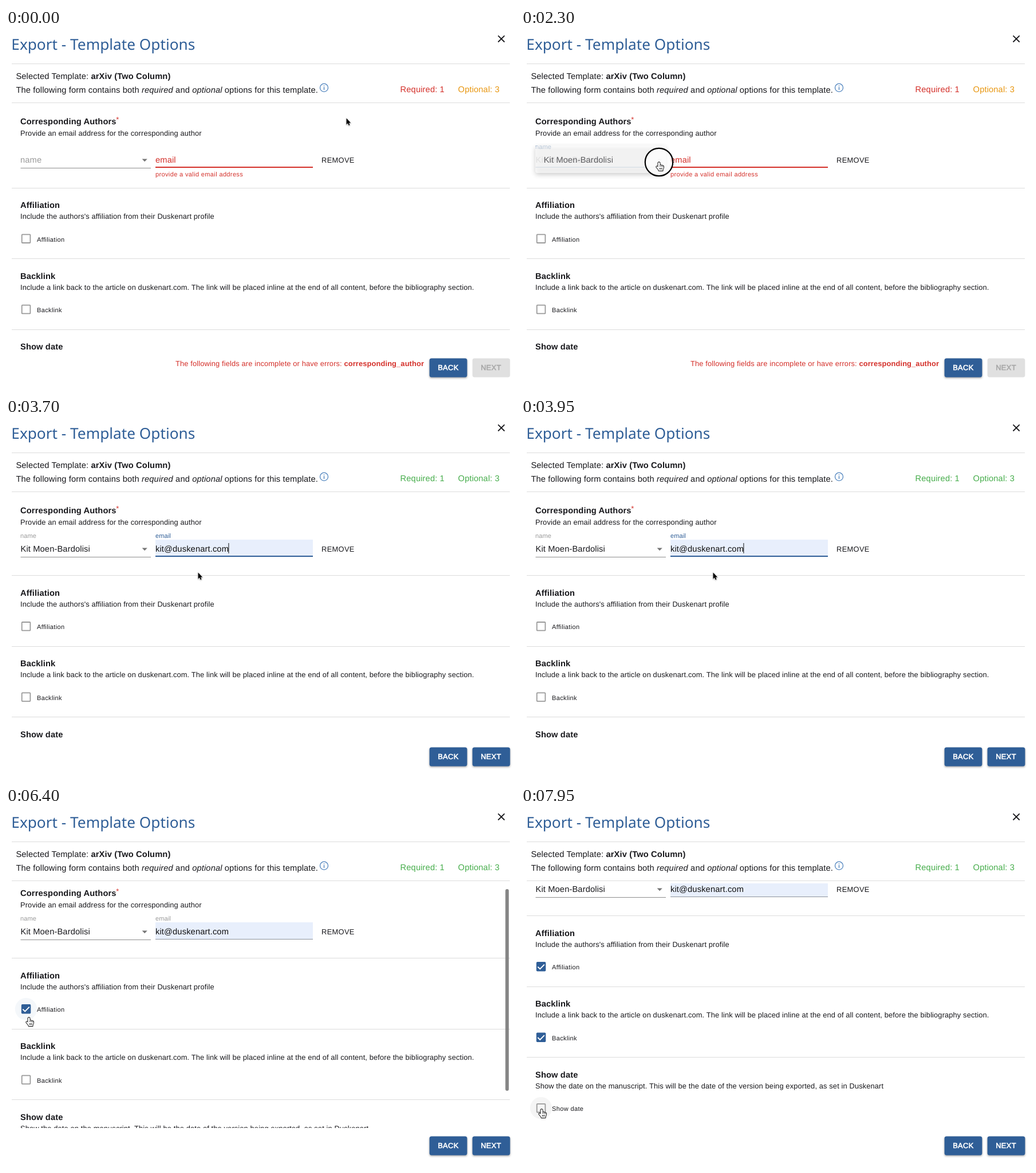
An HTML page with a canvas that plays this animation: 889x630 px, repeating every 8000 ms.

```html
<!DOCTYPE html>
<html lang="en">
<head>
<meta charset="utf-8">
<title>Export - Template Options</title>
<style>
html, body { margin: 0; width: 100%; height: 100%; overflow: hidden; background: #fff; }
canvas { display: block; width: 889px; height: 630px; }
</style>
</head>
<body>
<canvas id="stage"></canvas>
<script>
const W = 889, H = 630, LOOP = 8000, STEP = 50, S = 0.917;
const canvas = document.getElementById('stage');
const ctx = canvas.getContext('2d');
const dpr = window.devicePixelRatio || 1;
canvas.width = W * dpr;
canvas.height = H * dpr;

const BLUE = '#2f5e97', RED = '#d4302a', ORANGE = '#e8960f', GREEN = '#46ad4b';
const INK = '#18181c', GREY = '#9a9a9a', RULE = '#dcdcdc';
const PERSON = 'Kit Moen-Bardolisi', MAIL = 'kit@duskenart.com';

// Type styles: size and letter spacing before scaling
const BODY = [16, 0.15], SMALL = [14, 0.15], CAPTION = [12, 0.4], BUTTON = [14, 0.4];

// Moments when the form changes state
const T = { open: 1650, pick: 2250, email: 2850, popup: 3000, fill: 3550, valid: 3700, affil: 5850, back: 7300 };
const CLICKS = [1600, 2200, 2850, 3500, 5800, 7250];

const POINTER = [
  [450, 594, 157], [1000, 241, 234], [2600, 241, 234], [2850, 343, 233],
  [3200, 343, 233], [3450, 335, 271], [4950, 335, 271], [5300, 7, 405],
  [5650, 40, 369], [6700, 40, 369], [6900, 35, 392], [7050, 35, 399],
  [7550, 35, 399], [7900, 36, 529]
];
const SCROLL = [[6350, 0], [6400, 11], [6500, 48], [6600, 74], [6700, 85]];

const clamp = v => Math.max(0, Math.min(1, v));
const ramp = (t, from, len) => clamp((t - from) / len);
const smooth = k => k * k * (3 - 2 * k);
const mix = (a, b, k) => a + (b - a) * k;
const within = (v, a, b) => v >= a && v < b;

function track(keys, t, ease = k => k) {
  if (t <= keys[0][0]) return keys[0].slice(1);
  for (let i = 1; i < keys.length; i++) {
    const a = keys[i - 1], b = keys[i];
    if (t <= b[0]) {
      const k = ease((t - a[0]) / (b[0] - a[0]));
      return a.slice(1).map((v, n) => mix(v, b[n + 1], k));
    }
  }
  return keys[keys.length - 1].slice(1);
}

function text(str, x, y, [size, space], color = INK, style = '') {
  ctx.font = `${style} ${size * S}px "Liberation Sans", Arial, sans-serif`;
  ctx.letterSpacing = space * S + 'px';
  ctx.fillStyle = color;
  ctx.fillText(str, x, y);
  return x + ctx.measureText(str).width;
}

function rect(x, y, w, h, color) {
  ctx.fillStyle = color;
  ctx.fillRect(x, y, w, h);
}

function box(x, y, w, h, r, color) {
  ctx.beginPath();
  ctx.roundRect(x, y, w, h, r);
  ctx.fillStyle = color;
  ctx.fill();
}

function disc(x, y, r, fill, stroke, width) {
  ctx.beginPath();
  ctx.arc(x, y, r, 0, Math.PI * 2);
  if (fill) { ctx.fillStyle = fill; ctx.fill(); }
  if (stroke) { ctx.strokeStyle = stroke; ctx.lineWidth = width; ctx.stroke(); }
}

function line(points, color, width) {
  ctx.beginPath();
  points.forEach(([x, y], i) => i ? ctx.lineTo(x, y) : ctx.moveTo(x, y));
  ctx.strokeStyle = color;
  ctx.lineWidth = width;
  ctx.stroke();
}

function shadowed(alpha, blur, dy, draw) {
  ctx.save();
  ctx.shadowColor = `rgba(0,0,0,${alpha})`;
  ctx.shadowBlur = blur * dpr;
  ctx.shadowOffsetY = dy * dpr;
  draw();
  ctx.restore();
}

const rule = y => rect(10, Math.round(y - 0.5), 870, 1, RULE);

function header(valid) {
  ctx.font = `${28.6 * S}px "Noto Sans", "Open Sans", sans-serif`;
  ctx.letterSpacing = '0px';
  ctx.fillStyle = BLUE;
  ctx.fillText('Export - Template Options', 9.3, 37.5);
  line([[859.5, 13.3], [870.7, 24.5]], INK, 1.8);
  line([[870.7, 13.3], [859.5, 24.5]], INK, 1.8);
  rule(62.5);
  let x = text('Selected Template: ', 17.4, 89.3, BODY);
  text('arXiv (Two Column)', x, 89.3, BODY, INK, 'bold');
  x = 17.4;
  for (const [part, style] of [['The following form contains both ', ''], ['required', 'italic'],
    [' and ', ''], ['optional', 'italic'], [' options for this template.', '']]) {
    x = text(part, x, 113.3, BODY, INK, style);
  }
  disc(555.5, 104.2, 7, null, '#4d82bd', 1.3);
  rect(554.8, 103, 1.4, 5, '#4d82bd');
  rect(554.8, 100.2, 1.4, 1.5, '#4d82bd');
  text('Required: 1', 688.6, 111.7, BODY, valid ? GREEN : RED);
  text('Optional: 3', 789.6, 111.7, BODY, valid ? GREEN : ORANGE);
  rule(130.5);
}

function floatingLabel(str, x, k, color) {
  const e = smooth(k);
  text(str, x, mix(234.5, 211, e), [mix(16, 12, e), mix(0.15, 0.11, e)], color);
}

function nameField(t, hover) {
  const focus = within(t, T.open, T.email);
  floatingLabel('name', 25, ramp(t, T.open, 200), focus ? BLUE : GREY);
  if (t >= T.pick) text(PERSON, 25.5, 234.5, BODY);
  ctx.beginPath();
  ctx.moveTo(237.6, 228.6);
  ctx.lineTo(246.8, 228.6);
  ctx.lineTo(242.2, 233.2);
  ctx.fillStyle = '#757575';
  ctx.fill();
  if (focus) rect(25.5, 242, 227.5, 2, BLUE);
  else if (hover) rect(25.5, 243, 227.5, 2, INK);
  else rect(25.5, 244, 227.5, 1, '#8d8d8d');
}

function caretOn(t) {
  return within(t, T.email + 50, 3400) || within(t, T.fill, 4150) ||
    within(t, 4500, 4800) || within(t, 5000, 5500);
}

function emailField(t, valid) {
  const filled = t >= T.fill;
  const focus = within(t, T.email, T.affil);
  const tint = !valid ? RED : focus ? BLUE : GREY;
  if (filled) rect(261, 214, 275, 29, '#e8effc');
  floatingLabel('email', 261, ramp(t, T.email, 200), tint);
  let end = 261;
  if (filled) end = text(MAIL, 261, 234.5, BODY, '#111');
  if (caretOn(t)) rect(end + (filled ? -0.6 : 0.3), 220, 1, 18, '#111');
  if (!valid || focus) rect(261, 242, 275, 2, tint);
  else rect(261, 243, 275, 1, '#8e939b');
  if (!valid) text('provide a valid email address', 261, 259.2, CAPTION, RED);
  text('REMOVE', 551, valid ? 234.8 : 235.4, BUTTON);
}

function checkbox(y, checked, hover) {
  if (hover) disc(35, y, 19.2, checked ? 'rgba(47,94,151,.05)' : 'rgba(0,0,0,.04)');
  if (checked) {
    box(26.8, y - 8.2, 16.5, 16.5, 1.8, BLUE);
    line([[29.3, y + 0.3], [33.2, y + 4.2], [40.8, y - 3.6]], '#fff', 1.9);
  } else {
    ctx.beginPath();
    ctx.roundRect(27.7, y - 7.3, 14.7, 14.7, 1);
    ctx.strokeStyle = GREY;
    ctx.lineWidth = 1.8;
    ctx.stroke();
  }
}

const SECTIONS = [
  ['Affiliation', "Include the authors's affiliation from their Duskenart profile", T.affil],
  ['Backlink', 'Include a link back to the article on duskenart.com. The link will be placed inline at the end of all content, before the bibliography section.', T.back],
  ['Show date', 'Show the date on the manuscript. This will be the date of the version being exported, as set in Duskenart', Infinity]
];

function form(t, valid, scroll, [px, py]) {
  ctx.save();
  ctx.beginPath();
  ctx.rect(0, 135, W, 427);
  ctx.clip();
  ctx.translate(0, -scroll);
  text('Corresponding Authors', 25, 168.3, BODY, INK, 'bold');
  text('*', 192.3, 163.6, [14, 0], RED);
  text('Provide an email address for the corresponding author', 25, 187.6, SMALL);
  nameField(t, within(px, 25, 253) && within(py, 215, 245));
  emailField(t, valid);
  const shift = valid ? -2.3 : 0;
  rule(279 + shift);
  SECTIONS.forEach(([title, about, when], i) => {
    const y = 314.2 + shift + i * 123.4;
    text(title, 25, y, BODY, INK, 'bold');
    text(about, 25, y + 18.9, SMALL);
    checkbox(y + 53.4, t >= when, Math.hypot(px - 35, py + scroll - y - 53.4) < 19);
    text(title, 54, y + 58.4, CAPTION);
    if (i < 2) rule(y + 88.6);
  });
  ctx.restore();
}

function button(label, x, enabled) {
  const shape = () => box(x - 0.4, 576.4, 65.8, 33, 3.6, enabled ? BLUE : '#e0e0e0');
  if (enabled) shadowed(0.35, 3.5, 1.6, shape);
  else shape();
  const color = enabled ? '#fff' : '#a8a8a8';
  text(label, x + 14.2, 597, BUTTON, color);
  ctx.strokeStyle = color;
  ctx.lineWidth = 0.6;
  ctx.strokeText(label, x + 14.2, 597);
}

function footer(valid) {
  if (!valid) {
    const x = text('The following fields are incomplete or have errors: ', 296, 590.4, SMALL, RED);
    text('corresponding_author', x, 590.4, SMALL, RED, 'bold');
  }
  button('BACK', 740, true);
  button('NEXT', 815, valid);
}

function menu(t) {
  const k = smooth(ramp(t, T.open - 50, 250)) * (1 - ramp(t, T.pick, 150));
  if (!k) return;
  const grow = t < T.pick ? mix(0.75, 1, k) : 1;
  ctx.save();
  ctx.globalAlpha = k;
  ctx.translate(139, 229);
  ctx.scale(grow, grow);
  ctx.translate(-139, -229);
  shadowed(0.3, 9, 3, () => box(25, 205, 228, 48, 3.7, '#fff'));
  rect(25, 212.4, 228, 33, '#f5f5f5');
  text(PERSON, 39.7, 234.5, BODY);
  ctx.restore();
}

function suggestion(t, py) {
  if (!within(t, T.popup, T.fill)) return;
  shadowed(0.3, 5, 1.5, () => box(261, 245, 276, 43.5, 3.5, '#292d2e'));
  if (py > 250) rect(261, 251, 276, 31, '#3d4142');
  text(MAIL, 271, 271, [12, 0], '#fff', 'bold');
}

function scrollbar(t, scroll) {
  const alpha = t < 6400 ? 0 : 1 - ramp(t, 7200, 250);
  ctx.globalAlpha = alpha;
  if (alpha) box(872.2, 135.6 + scroll * 0.85, 6, 352, 3, '#858585');
  ctx.globalAlpha = 1;
}

const ARROW = new Path2D('M.6 .4V11.4L3.1 9L4.7 12.9L6.5 12.2L4.9 8.4H8.2Z');
const HAND = new Path2D('M-1.6 1.2Q0-.8 1.6 1.2L1.8 5.5Q3.2 4.3 4.2 6Q5.6 5 6.4 6.6Q8 6 8 8L7.8 10.5L6.6 13.2V15H-.6L-.8 13.4L-4.6 8.9Q-5 6.9-3 7.4L-1.6 8.8Z');
const CREASES = new Path2D('M1.8 5.5V8M4.2 6V8.2M6.3 6.8V8.6M1.3 10V13M3.2 10V13M5.1 10V13');
const BEAM = new Path2D('M-3-6.5H-1.5L0-5.5L1.5-6.5H3M0-5.5V5.5M-3 6.5H-1.5L0 5.5L1.5 6.5H3M-1.4 2H1.4');

function paint(path, fill, stroke, width) {
  ctx.strokeStyle = stroke;
  ctx.lineWidth = width;
  ctx.stroke(path);
  if (fill) { ctx.fillStyle = fill; ctx.fill(path); }
}

function pointer(t, scroll, [x, y]) {
  if (CLICKS.some(c => within(t, c, c + 150))) disc(x, y, 24.2, 'rgba(255,255,255,.7)', '#000', 2.2);
  const overSelect = within(x, 25, 253) && within(y, 215, 245);
  const overCheck = SECTIONS.some((s, i) => Math.hypot(x - 35, y + scroll - 365.3 - i * 123.4) < 19);
  ctx.save();
  ctx.translate(x, y);
  ctx.lineJoin = 'round';
  if (overSelect || overCheck) {
    paint(HAND, '#fff', '#000', 1.8);
    paint(CREASES, null, '#000', 0.8);
  } else if (within(x, 261, 536) && within(y, 215, 244)) {
    paint(BEAM, null, '#fff', 2.4);
    paint(BEAM, null, '#000', 1.2);
  } else {
    shadowed(0.25, 2, 0.8, () => paint(ARROW, '#000', '#fff', 1.6));
  }
  ctx.restore();
}

function draw(t) {
  const valid = t >= T.valid;
  const scroll = Math.round(track(SCROLL, t)[0]);
  const pos = track(POINTER, t, smooth);
  ctx.setTransform(dpr, 0, 0, dpr, 0, 0);
  ctx.textRendering = 'geometricPrecision';
  rect(0, 0, W, H, '#fff');
  header(valid);
  form(t, valid, scroll, pos);
  footer(valid);
  menu(t);
  suggestion(t, pos[1]);
  scrollbar(t, scroll);
  pointer(t, scroll, pos);
}

const start = performance.now();
function tick() {
  const t = (performance.now() - start) % LOOP;
  draw(Math.floor(t / STEP) * STEP);
  requestAnimationFrame(tick);
}
tick();
</script>
</body>
</html>
```
